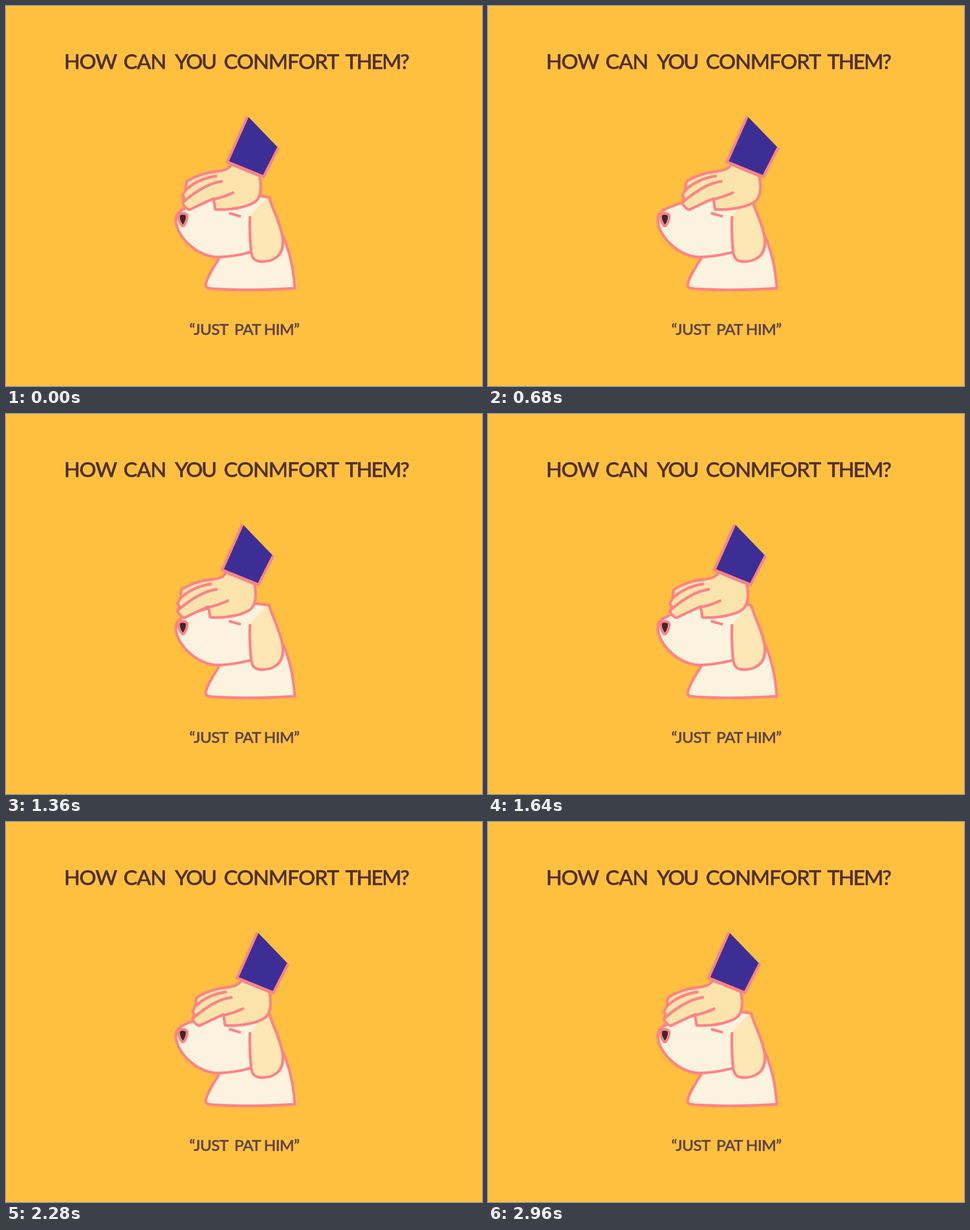
An HTML page that plays this animation: 837 px wide and 669 px high, repeating every 3 s.

```html
<!DOCTYPE html>
<html lang="en">
<head>
<meta charset="utf-8">
<title>Just pat him</title>
<style>
  html, body { margin: 0; width: 100%; height: 100%; overflow: hidden; background: #ffc040; }
  svg { display: block; width: 837px; height: 669px; }
  text { font-family: Lato, "Open Sans", sans-serif; font-weight: 500; stroke-width: 0.6; }
  .title { font-size: 37px; letter-spacing: -1.2px; fill: #4f2f2c; stroke: #4f2f2c; }
  .tight { letter-spacing: -2.4px; }
  .caption { font-size: 27.5px; letter-spacing: -0.6px; fill: #5f4440; stroke: #5f4440; }
  .ink { stroke: #ff8287; stroke-width: 4.8; stroke-miterlimit: 10; }
  .fur { fill: #fcf3df; }
  .ear { fill: #fce7b5; }
  .skin { fill: #fbe4ac; }
  .line { fill: none; }
</style>
</head>
<body>
<svg viewBox="0 0 837 669">
  <rect width="837" height="669" fill="#ffc040"/>
  <text class="title" y="111"><tspan x="102">HOW</tspan> <tspan x="206.5">CAN</tspan> <tspan x="297" class="tight">YOU</tspan> <tspan x="383">CONMFORT</tspan> <tspan x="596.5" class="tight">THEM?</tspan></text>
  <text class="caption" y="579"><tspan x="322.5">“JUST</tspan> <tspan x="401.500">PAT</tspan> <tspan x="453.500">HIM”</tspan></text>

  <g id="dog">
    <path class="ink fur" d="M377 441C366 458 353 478 351 491C351 497 356 497 366 498C410 501 460 500 508 497C505 460 499 432 486 403"/>
    <path class="fur" d="M432 433C412 438 392 442 372 442C336 442 298.500 405 298.500 376C298.500 362 311 356 345 345C385 334 430 330 463 337L470 380Z"/>
    <path class="ear" d="M429 370L458 338H463C465 350 487 390 487 416C487 440 470 450 450 450C437 450 432 444 431 432Z"/>
    <path class="ink line" d="M432 433C412 438 392 442 372 442C336 442 298.500 405 298.500 376C298.500 362 311 356 345 345C385 334 430 330 463 337C465 350 487 390 487 416C487 440 470 450 450 450C437 450 432 444 431 432C429 412 428 390 429 370"/>
    <path class="ink line" d="M392 364.500L413 370.500"/>
    <path d="M306 369C307 367 314 367 316 369C317 374 314 381 311 385C308 381 305 374 306 369Z" fill="#3a2a2a" stroke="#ff8287" stroke-width="9.500" stroke-linejoin="round" paint-order="stroke"/>
  </g>

  <g id="hand">
    <path class="ink skin" stroke-linejoin="round" d="M397 279C389 289 381 290 372 291C352 293 332 300 319 308C315 313 317 319 316 324L310.500 333.500L314 339L310.500 347C313 352 317 358 323 358.500C337 352 351 345 365 339L368 358C400 360 430 352 440 343C450 333 449 315 446 299Z"/>
    <path class="ink line" d="M371 299C350 302 330 310 314 326M381 308.500C360 311 335 325 312 345M401 328C390 333 378 338 365 340"/>
    <path fill="#3d2e96" d="M426 195L478.500 249.500L453 300L389 274.500Z"/>
    <path class="ink line" d="M424.500 194.500L389 274.500L453 300.500L479 249.500"/>
  </g>
</svg>
<script>
  const LOOP = 3000;
  const STEP = 40;
  // [time in ms, horizontal offset in px], joined by straight motion
  const strokes = [[0, 0], [640, 33.5], [1360, -9], [2020, 33.5], [2700, -9], [LOOP, 0]];
  const hand = document.getElementById("hand");

  function offsetAt(time) {
    const next = strokes.findIndex(([end]) => time < end);
    const [t0, x0] = strokes[next - 1];
    const [t1, x1] = strokes[next];
    return x0 + (x1 - x0) * (time - t0) / (t1 - t0);
  }

  function render(now) {
    const time = Math.floor((now + 1) / STEP) * STEP % LOOP;
    hand.setAttribute("transform", `translate(${offsetAt(time).toFixed(2)} 0)`);
  }

  let start;
  function tick(now) {
    start ??= now;
    render(now - start);
    requestAnimationFrame(tick);
  }
  render(0);
  requestAnimationFrame(tick);
</script>
</body>
</html>
```
